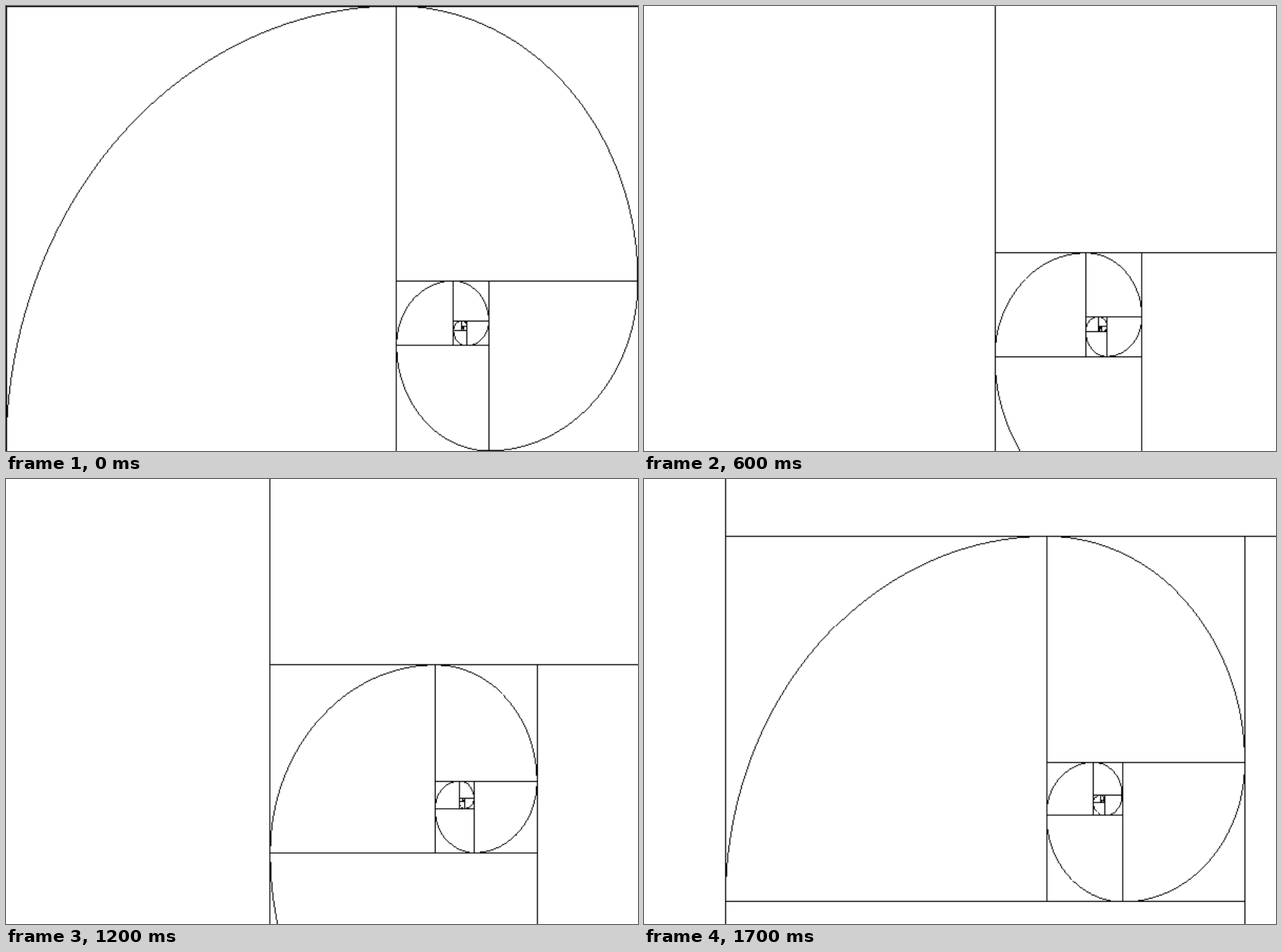
These frames come from a looping animation (800x564 px, 1800 ms). An HTML page with a canvas:

```html
<!DOCTYPE html>
<html lang="en">
<head>
<meta charset="utf-8">
<title>Golden spiral zoom</title>
<style>
  html, body { margin: 0; width: 100%; height: 100%; overflow: hidden; background: #fff; }
  canvas { display: block; width: 800px; height: 564px; }
</style>
</head>
<body>
<!-- Hard-edged pixels on a coarser grid, softened as they are enlarged. -->
<canvas id="stage" width="600" height="423"></canvas>
<script>
const ctx = document.getElementById('stage').getContext('2d');
const PHI = (1 + Math.sqrt(5)) / 2;
const WIDTH = 599.95, HEIGHT = 422.8;
const POLE = PHI * PHI / (PHI * PHI + 1);   // where the spiral converges, as a share of each side
const STEP = 100, STEPS = 18;
const snap = Math.floor;

function plot(x, y) {
  ctx.fillRect(snap(x), snap(y), 1, 1);
}

function hLine(x1, x2, y) {
  ctx.fillRect(snap(x1), snap(y), snap(x2) - snap(x1) + 1, 1);
}

function vLine(x, y1, y2) {
  ctx.fillRect(snap(x), snap(y1), 1, snap(y2) - snap(y1) + 1);
}

// Quarter ellipse around (cx, cy) reaching out to the edges ex and ey:
// one pixel per column where it is flat, one per row where it is steep.
function arc(cx, cy, ex, ey) {
  const rx = Math.abs(ex - cx), ry = Math.abs(ey - cy);
  const sx = Math.sign(ex - cx), sy = Math.sign(ey - cy);
  const diagonal = Math.hypot(rx, ry);
  for (let dx = 0; dx <= rx * rx / diagonal; dx++) {
    plot(cx + sx * dx, cy + sy * ry * Math.sqrt(1 - (dx / rx) ** 2));
  }
  for (let dy = 0; dy <= ry * ry / diagonal; dy++) {
    plot(cx + sx * rx * Math.sqrt(1 - (dy / ry) ** 2), cy + sy * dy);
  }
}

function zoomAt(step) {
  return Math.exp(step * (.0725 + .00042 * step + .0000763 * step * step));
}

function draw(step) {
  const zoom = zoomAt(step);
  let left = WIDTH * POLE * (1 - zoom), top = HEIGHT * POLE * (1 - zoom);
  let right = left + WIDTH * zoom, bottom = top + HEIGHT * zoom;

  ctx.fillStyle = '#fff';
  ctx.fillRect(0, 0, 600, 423);
  ctx.fillStyle = '#000';
  hLine(left, right, top);
  vLine(left, top, bottom);

  // Cut off the left, top, right and bottom part in turn.
  for (let level = 0; right - left > 1.5; level++) {
    const w = (right - left) / PHI, h = (bottom - top) / PHI;
    const side = level % 4;
    if (side === 0) {
      const x = left + w;
      vLine(x, top, bottom);
      arc(x, bottom, left, top);
      left = x;
    } else if (side === 1) {
      const y = top + h;
      hLine(left, right, y);
      arc(left, y, right, top);
      top = y;
    } else if (side === 2) {
      const x = right - w;
      vLine(x, top, bottom);
      arc(x, top, right, bottom);
      right = x;
    } else {
      const y = bottom - h;
      hLine(left, right, y);
      arc(right, y, left, bottom);
      bottom = y;
    }
  }
}

const start = performance.now();
function tick() {
  draw(Math.floor((performance.now() - start) / STEP) % STEPS);
  requestAnimationFrame(tick);
}
tick();
</script>
</body>
</html>
```
